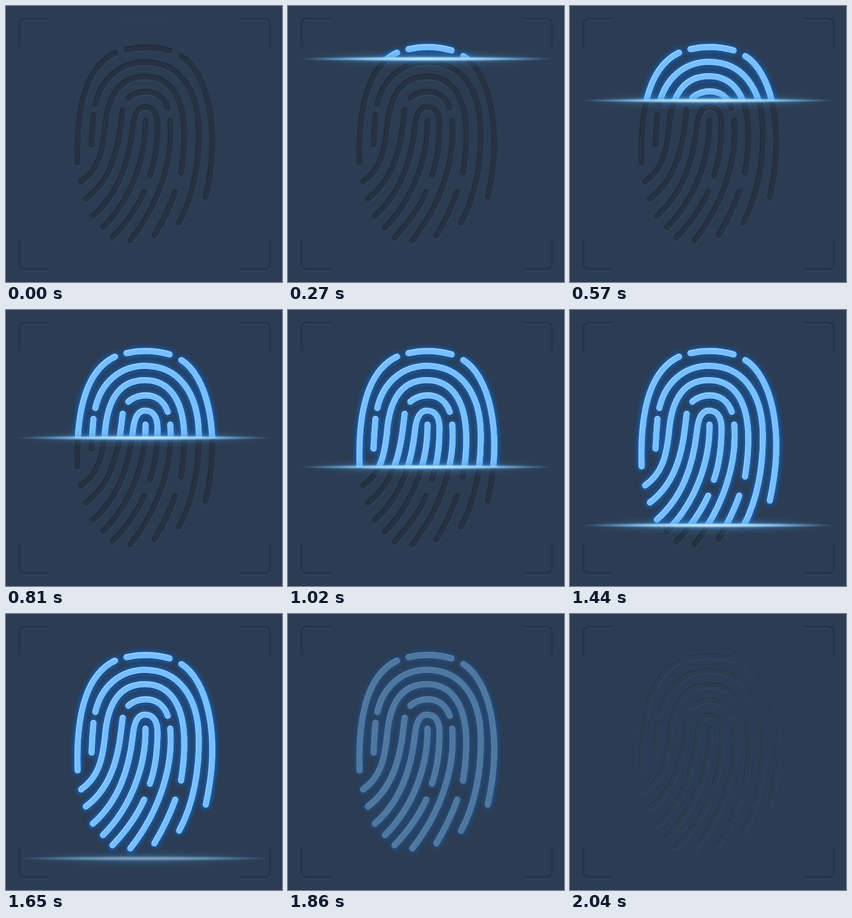
Write an HTML page that moves like this. It is 435 by 435 pixels and loops after 2.07 s.

```html
<!DOCTYPE html>
<html lang="en">
<head>
<meta charset="utf-8">
<title>Fingerprint scan</title>
<style>
  html, body { margin: 0; width: 100%; height: 100%; overflow: hidden; background: #2c3c52; }
  svg { display: block; width: 100%; height: 100%; }
</style>
</head>
<body>
<svg viewBox="0 0 435 435">
  <defs>
    <g id="ridges" fill="none" stroke-linecap="round">
      <path d="M190 68.5Q224 61 258 70.5"/>
      <path d="M172 74C130 94 110 150 113 247"/>
      <path d="M276.5 79.5C316 104 340 190 315 301"/>
      <path d="M141 155C150 115 180 88.5 219 88.5C272 88.5 303 131 304 195C305 245 296 300 273 342"/>
      <path d="M118.5 277C146 258 152 230 156 195C160 140 180 111 219 111C258 111 279 143 281 195C282 220 279 245 276 263"/>
      <path d="M138 172Q136 195 135 219"/>
      <path d="M193 145C210 130 244 129 255 161"/>
      <path d="M184 164C179 208 174 268 126 304"/>
      <path d="M137 331C178 295 194 245 200 193C202 171 208 159 219 159C233 159 239 171 239 187C239 215 235 245 227 268"/>
      <path d="M220 181C221 240 197 305 153 349"/>
      <path d="M218 293C206 320 189 343 168 365"/>
      <path d="M259 181C264 240 243 310 196 370"/>
      <path d="M267 293C258 318 247 340 234 362"/>
    </g>
    <g id="corners" fill="none">
      <path id="corner" d="M21 66V30Q21 20 31 20H68"/>
      <use href="#corner" transform="matrix(-1 0 0 1 437 0)"/>
      <use href="#corner" transform="matrix(1 0 0 -1 0 435)"/>
      <use href="#corner" transform="matrix(-1 0 0 -1 437 435)"/>
    </g>
    <filter id="wide" filterUnits="userSpaceOnUse" x="60" y="20" width="320" height="400"><feGaussianBlur stdDeviation="5.5"/></filter>
    <filter id="tight" filterUnits="userSpaceOnUse" x="60" y="20" width="320" height="400"><feGaussianBlur stdDeviation="2.4"/></filter>
    <radialGradient id="halo">
      <stop offset="0" stop-color="#58b4f5" stop-opacity=".75"/>
      <stop offset=".4" stop-color="#4aa4ea" stop-opacity=".35"/>
      <stop offset="1" stop-color="#3c8fd8" stop-opacity="0"/>
    </radialGradient>
    <radialGradient id="core">
      <stop offset="0" stop-color="#d0ebfd"/>
      <stop offset=".5" stop-color="#a3d3f3" stop-opacity=".85"/>
      <stop offset="1" stop-color="#6db4e8" stop-opacity="0"/>
    </radialGradient>
    <clipPath id="scanned"><rect id="reveal" width="435" height="0"/></clipPath>
  </defs>

  <rect width="435" height="435" fill="#2c3c52"/>
  <use href="#corners" y="1.2" stroke="#33445b" stroke-width="4"/>
  <use href="#corners" stroke="#25344a" stroke-width="3.6"/>

  <use href="#ridges" x=".5" y="1.4" stroke="#394a61" stroke-width="9"/>
  <use href="#ridges" stroke="#202a39" stroke-width="9"/>
  <use href="#ridges" x=".4" y="1" stroke="#263244" stroke-width="7.4"/>

  <g clip-path="url(#scanned)">
    <g id="lit">
      <use href="#ridges" stroke="#0f70e4" stroke-width="11" opacity=".7" filter="url(#wide)"/>
      <use href="#ridges" stroke="#157af0" stroke-width="11" opacity=".7" filter="url(#tight)"/>
      <use href="#ridges" x=".4" y="1.2" stroke="#17406f" stroke-width="9.4"/>
      <use href="#ridges" y="-.2" stroke="#5aa8f5" stroke-width="9.5"/>
      <use href="#ridges" x="-.2" y="-.6" stroke="#b4deff" stroke-width="9"/>
      <use href="#ridges" x=".2" y=".2" stroke="#78bfff" stroke-width="8.2"/>
    </g>
  </g>

  <g id="beam">
    <ellipse cx="217.5" rx="197" ry="16" fill="url(#halo)" opacity=".55"/>
    <ellipse cx="217.5" rx="202" ry="8" fill="url(#halo)"/>
    <ellipse cx="217.5" rx="202" ry="4" fill="url(#core)"/>
  </g>
</svg>
<script>
  const LOOP = 2070, BEAM_END = 1755, FADE_START = 1650;
  const [reveal, lit, beam] = ["reveal", "lit", "beam"].map(id => document.getElementById(id));
  const clamp = v => Math.max(0, Math.min(1, v));

  function draw(t) {
    const y = 24 + t * 0.2188;
    reveal.setAttribute("height", y);
    lit.setAttribute("opacity", clamp((LOOP - t) / (LOOP - FADE_START)));
    beam.setAttribute("transform", `translate(0 ${y})`);
    beam.setAttribute("opacity", clamp(Math.min(t, BEAM_END - t) / 180));
  }

  function tick() {
    draw(performance.now() % LOOP);
    requestAnimationFrame(tick);
  }
  draw(0);
  requestAnimationFrame(tick);
</script>
</body>
</html>
```
